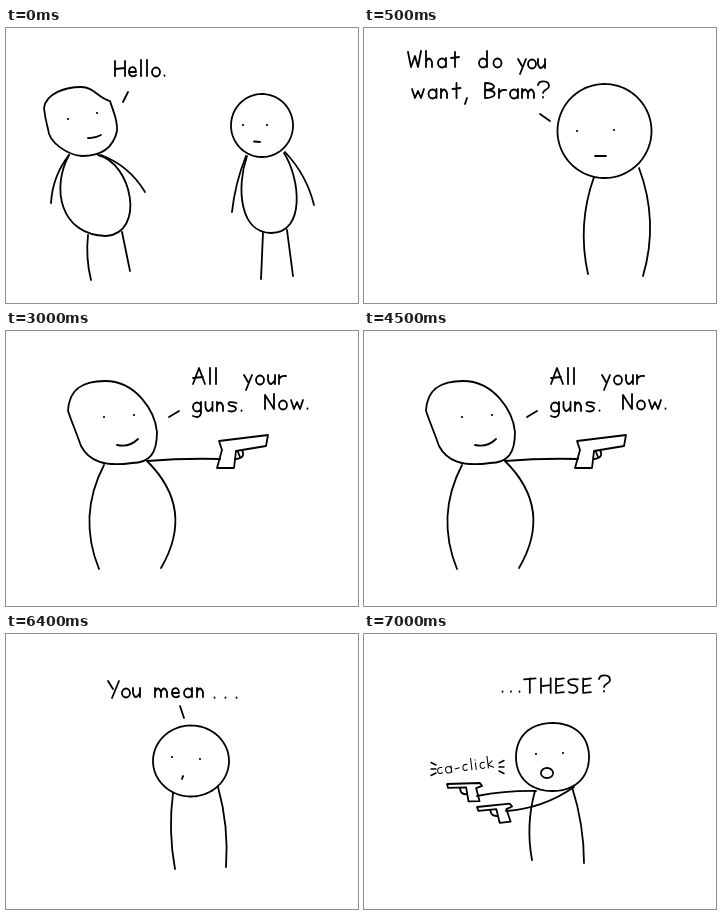
Recreate the animation shown at these times as an HTML page with a canvas. Size 352x275 px, loop 8000 ms.

```html
<!DOCTYPE html>
<html lang="en">
<head>
<meta charset="utf-8">
<title>Hello</title>
<style>
  html, body { margin: 0; width: 100%; height: 100%; overflow: hidden; background: #fff; }
  canvas { display: block; width: 100vw; height: 100vh; }
</style>
</head>
<body>
<canvas id="stage" width="352" height="275"></canvas>
<script>
const ctx = document.getElementById('stage').getContext('2d');
const LOOP = 8000;

// Pen lettering built from shared strokes; the baseline is y = 0.
const X = 9, CAP = 15, TALL = 16;
const stem = (x, h) => `M${x} 0V${-h}`;
const bar = (y, w) => `M0 ${-y}L${w} ${-y - 1}`;
const arch = x => `M${x}-5q3-7 6 0v5`;
const cup = `M0-${X}v5q2 8 7 0`;
const bowl = 'M0-4a4 4.5 0 1 0 8 0a4 4.5 0 1 0-8 0';
const dot = 'M.5-.7v.5';

// letter: [width, strokes]
const glyphs = {
  A: [12, 'M0 0L6-16L12 0' + bar(6, 10)],
  B: [10, stem(0, CAP) + 'M0-15c12 0 12 7 0 7c13 0 13 8 0 8'],
  E: [8, stem(0, CAP) + bar(14, 8) + bar(7, 7) + bar(0, 8)],
  H: [10, stem(0, CAP) + stem(10, CAP) + bar(7, 10)],
  N: [10, 'M0 0V-14L9 0V-15'],
  S: [9, 'M9-14C-6-16-1-8 4-8C12-7 9 3 0-1'],
  T: [12, stem(6, CAP) + bar(14, 12)],
  W: [13, 'M0-15L3 0L7-11L10 0L13-16'],
  Y: [11, 'M0-16L5-8M11-16L4 1'],
  a: [8, bowl + stem(8, X)],
  c: [6, 'M6-8C-2-11-2 3 6-1'],
  d: [9, bowl + stem(8, TALL)],
  e: [7, 'M0-4H7C7-11 0-10 0-4C0 1 5 1 7-1'],
  g: [8, bowl + 'M8-9V2Q7 8 0 5'],
  h: [7, stem(0, TALL) + arch(0)],
  i: [1, stem(0, X) + 'M0-13v.5'],
  k: [7, stem(0, TALL) + 'M6-9L0-4L7 0'],
  l: [2, stem(1, TALL)],
  m: [12, stem(0, X) + arch(0) + arch(6)],
  n: [7, stem(0, X) + arch(0)],
  o: [8, bowl],
  r: [7, stem(0, X) + 'M0-5Q2-9 7-8'],
  s: [8, 'M8-8C-3-11-1-5 4-5C10-4 8 2 0 0'],
  t: [8, stem(4, CAP) + bar(9, 8)],
  u: [7, cup + stem(7, X)],
  w: [12, 'M0-9L3 0L6-7L9 0L12-9'],
  y: [8, 'M0-9L4-2M8-9L2 6'],
  '.': [1, dot],
  ',': [2, 'M2 0L0 6'],
  '-': [6, bar(4, 6)],
  '?': [11, 'M0-13C1-18 11-18 11-12C11-8 6-9 5-5M5-1v.5']
};

function write(text, x, y, gap, size = 1, tilt = 0) {
  ctx.save();
  ctx.translate(x, y);
  ctx.rotate(tilt);
  ctx.scale(size, size);
  for (const ch of text) {
    const [width, strokes] = glyphs[ch];
    draw(strokes);
    ctx.translate(width + gap, 0);
  }
  ctx.restore();
}

function draw(path) {
  ctx.stroke(new Path2D(path));
}

// Pen stroke from one point to another, bulging sideways at its middle.
function bend(x1, y1, x2, y2, bulge = 0) {
  const dx = x2 - x1, dy = y2 - y1, k = 2 * bulge / Math.hypot(dx, dy);
  ctx.beginPath();
  ctx.moveTo(x1, y1);
  ctx.quadraticCurveTo((x1 + x2) / 2 + k * dy, (y1 + y2) / 2 - k * dx, x2, y2);
  ctx.stroke();
}

// Ellipse; a positive "square" pushes its diagonals outwards.
function oval(x, y, rx, ry, square = 0) {
  ctx.beginPath();
  for (let a = 0; a < 2 * Math.PI; a += 0.05) {
    const r = 1 + square * (1 - Math.cos(4 * a));
    ctx.lineTo(x + rx * r * Math.cos(a), y + ry * r * Math.sin(a));
  }
  ctx.closePath();
  ctx.stroke();
}

function eye(x, y) {
  ctx.beginPath();
  ctx.arc(x, y, 1.1, 0, 2 * Math.PI);
  ctx.fill();
}

function pistol(x, y, tilt) {
  ctx.save();
  ctx.translate(x, y);
  ctx.rotate(tilt);
  draw('M0 0H33L35 3L29 5L32 18H21L19 4H1ZM13 5Q13 11 20 11');
  ctx.restore();
}

// Three short strokes fanning out from a sound.
function burst(x, y, side) {
  for (const i of [-1, 0, 1]) bend(x, y + 4 * i, x + 5 * side, y + 6.5 * i);
}

function greeting() {
  write('Hello.', 109, 48, 4);
  bend(122, 64, 117, 74);
  draw('M38 80C40 65 60 59 75 59C88 59 92 70 104 73C107 83 112 92 111 103' +
    'C107 121 94 128 76 128C62 127 43 115 42 101Q39 90 38 80');
  eye(62, 91);
  eye(91, 85);
  bend(82, 110, 95, 107, -1);
  draw('M63 127C45 160 54 207 100 208C140 205 126 135 92 127');
  bend(63, 127, 45, 175, -4);
  bend(95, 127, 139, 164, 5);
  bend(82, 207, 85, 252, -2);
  bend(116, 204, 124, 243);

  oval(256, 97.5, 31, 31.5);
  eye(237, 97);
  eye(261, 97);
  bend(248, 113.5, 254, 114);
  draw('M241 128C230 160 234 205 265 205C300 205 294 150 278 125');
  bend(240, 128, 226, 184, -2);
  bend(279, 124, 308, 177, 4);
  bend(257, 205, 255, 251);
  bend(281, 202, 287, 248);
}

function question() {
  write('What', 44, 39, 5);
  write('do', 115, 39, 5.5);
  write('you', 154, 40, 2);
  write('want,', 48, 70, 4.5);
  write('Bram?', 121, 70, 4);
  bend(176, 86, 186, 93);
  oval(240.5, 103, 47, 47);
  eye(213, 103);
  eye(250, 102);
  bend(231, 128, 242, 128);
  bend(230, 149, 224, 246, -7);
  bend(275, 140, 279, 248, 9);
}

function demand() {
  write('All', 187, 53, 4);
  write('your', 238, 53, 4);
  write('guns.', 187, 80, 4.5);
  write('Now.', 259, 78, 4);
  bend(163, 86, 173, 80);
  draw('M62 80C63 57 78 50 99 50C130 50 149 80 151 101' +
    'C151 122 144 132 126 132C98 136 83 130 75 115C68 95 69 100 62 80');
  eye(98, 86);
  eye(128, 84);
  bend(111, 114, 132, 108, -3);
  bend(98, 134, 93, 238, -12);
  bend(141, 130, 155, 237, 21);
  bend(141, 130, 214, 128, 1);
  draw('M213 110L262 104L260 115L230 120L228 137L211 137L216 119Z');
  draw('M236 119Q240 127 230 128M232 121L234 126');
}

function pause() {
  write('You', 102, 63, 3);
  write('mean', 149, 63, 5);
  write('...', 208, 64, 10);
  bend(174, 72, 178, 84);
  oval(185, 127, 38, 35.5);
  eye(166, 123);
  eye(194, 125);
  bend(177, 142, 176, 145);
  bend(167, 159, 169, 235, -3);
  bend(212, 153, 220, 233, 3.5);
}

function reveal() {
  write('...', 138, 58, 7.5);
  write('THESE', 160, 59, 5.5, 0.97);
  write('?', 235, 58, 0);
  oval(188.5, 123, 36.5, 34, 0.015);
  eye(172, 120);
  eye(199, 119);
  oval(183, 139, 6, 5);
  bend(171, 157, 168, 226, -4);
  bend(208, 153, 220, 229, 3);
  bend(113, 162, 172, 157, 1.5);
  bend(142, 177, 210, 153, -5);
  pistol(83, 150, -0.03);
  pistol(113, 173, -0.1);
  ctx.lineWidth = 1.4;
  write('ca-click', 74, 140, 4.8, 0.74, -0.12);
  burst(72, 135, -1);
  burst(135, 133, 1);
}

const scenes = [[0, greeting], [500, question], [3000, demand], [5500, pause], [7000, reveal]];
const start = performance.now();

function render(now) {
  const t = Math.max(0, now - start) % LOOP;
  ctx.fillStyle = '#fff';
  ctx.fillRect(0, 0, 352, 275);
  ctx.fillStyle = ctx.strokeStyle = '#000';
  ctx.lineWidth = 1.8;
  ctx.lineCap = ctx.lineJoin = 'round';
  scenes.findLast(([from]) => t >= from)[1]();
  requestAnimationFrame(render);
}
render(start);
</script>
</body>
</html>
```
